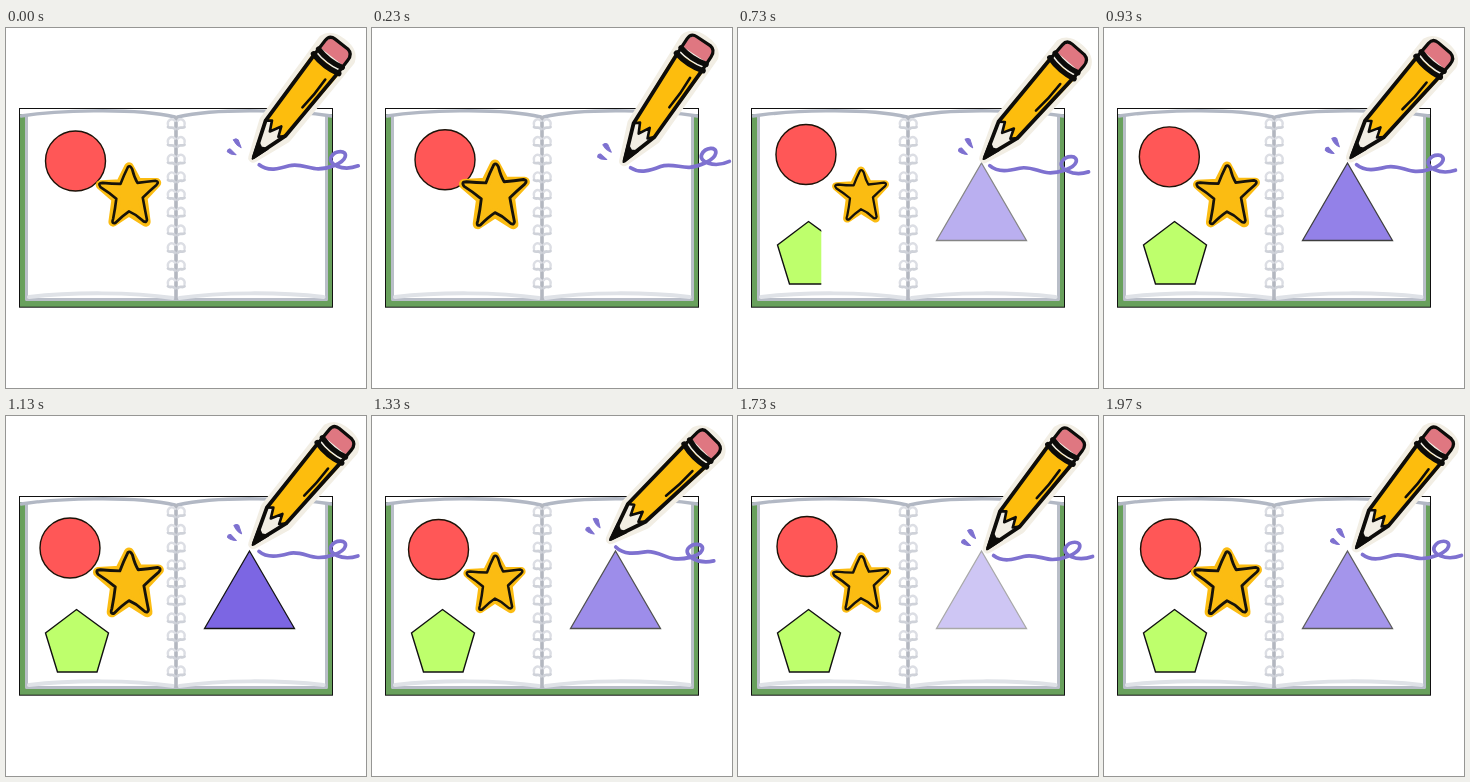
These frames come from a looping animation (360x360 px, 2.01 s). An HTML page:

```html
<!DOCTYPE html>
<html lang="en">
<head>
<meta charset="utf-8">
<title>Notebook</title>
<style>
  html, body { margin: 0; width: 100%; height: 100%; overflow: hidden; background: #fff; }
  svg { display: block; width: 100vw; height: 100vh; }
  .line { fill: none; stroke-linecap: round; stroke-linejoin: round; }
</style>
</head>
<body>
<svg viewBox="0 0 360 360">
  <defs>
    <clipPath id="wipe"><rect id="wipeBox" x="38" y="190" width="0" height="70"/></clipPath>
    <g id="ring" class="line">
      <path d="M169 -3C165 -7 161 -3 162 1" stroke="#dcdee4" stroke-width="2.4"/>
      <path d="M162 3C164 5 167 2 169 5" stroke="#cfd2d9" stroke-width="2.8"/>
    </g>
    <g id="pageEdges" class="line">
      <path d="M15 88C48 83 125 79 169 89" stroke="#b2b8c4" stroke-width="3.4"/>
      <path d="M23 269C66 264 126 264 167 270" stroke="#dfe2e7" stroke-width="4"/>
    </g>
  </defs>

  <g id="book">
    <path d="M14 86h7V272H320V86h6V279H14Z" fill="#68a05c"/>
    <path d="M20.5 88V271.5H320.5V88" class="line" stroke="#b9bec8" stroke-width="3"/>
    <use href="#pageEdges"/>
    <use href="#pageEdges" transform="matrix(-1 0 0 1 340.5 0)"/>
    <path d="M170 88V272" stroke="#b3b7c0" stroke-width="3.6"/>
    <g id="rings"></g>
    <rect x="13.5" y="80.5" width="313" height="198.7" fill="none" stroke="#111"/>
  </g>

  <circle id="disc" r="30" fill="#ff5757" stroke="#1c1208" stroke-width="1.4"/>
  <path d="M70.5 193.5L102.5 217L91 256H51.5L39.5 217Z" clip-path="url(#wipe)"
        fill="#beff6c" stroke="#111" stroke-width="1.4"/>
  <path id="triangle" d="M243.5 135L288.5 212.5H198.5Z" fill="#7a64e3" stroke="#111" stroke-width="1.3"/>

  <g id="star" stroke-linejoin="round">
    <path d="M0 -27L8 -12L26 -12L13 2L16 25L0 15L-15 25L-12 3L-27 -10L-8 -11Z"
          fill="#fbbc12" stroke="#fbbc12" stroke-width="9"/>
    <path d="M-1 -27Q1 -29 3 -25Q5 -17 8 -12Q17 -13 25 -14Q29 -13 26 -10Q19 -4 13 2Q15 13 17 23Q16 27 12 23Q7 18 0 15Q-6 19 -13 26Q-17 27 -15 22Q-13 12 -12 3Q-19 -3 -27 -8Q-30 -12 -25 -12Q-16 -11 -8 -11Q-5 -19 -1 -27Z"
          class="line" stroke="#17130a" stroke-width="2.5"/>
  </g>

  <g id="doodle">
    <path d="M-44 34C-35 41 -24 38 -14 35S6 38 15 38S40 33 42 26S32 19 28 26S39 41 55 35"
          class="line" stroke="#7e71d0" stroke-width="3.7"/>
    <path d="M-70 9Q-67 7 -65 9L-62 17Q-67 15 -70 9ZM-76 21Q-76 18 -73 18L-67 24Q-73 24 -76 21Z"
          fill="#7e71d0" stroke="#7e71d0" stroke-linejoin="round"/>
    <g transform="translate(-50 27) rotate(37.8)" stroke-linejoin="round">
      <path d="M0 0L-14 -36L-17 -136Q-14 -145 0 -145Q14 -145 17 -136L14 -36Z"
            fill="#f2eee4" stroke="#f2eee4" stroke-width="10"/>
      <path d="M-14 -37L-17 -120H17L13 -37L7 -32L3 -42L-3 -31L-8 -41Z" fill="#fdbd0d"/>
      <path d="M-14 -128Q-15 -144 -8 -144H8Q16 -143 14 -128Z" fill="#df7781"/>
      <g class="line" stroke="#0d0c0a" stroke-width="3.8">
        <path d="M0 -1L-13 -37L-15 -121M0 -1L12 -37L15 -121"/>
        <path d="M-13 -37L-8 -41L-3 -31L3 -42L7 -32L12 -37" stroke-width="2.6"/>
        <path d="M-16 -119Q0 -115 16 -119M-15 -126Q0 -122 15 -126" stroke-width="5.4"/>
        <path d="M-15 -120V-137Q-15 -144 -8 -144H8Q15 -143 15 -135V-120" stroke-width="3.2"/>
        <path d="M8 -70Q10 -88 9 -106" stroke-width="2.6"/>
      </g>
      <path d="M0 1L-6 -16L0 -13L6 -16Z" fill="#0d0c0a" stroke="#0d0c0a" stroke-width="2"/>
    </g>
  </g>
</svg>

<script>
  const LOOP = 2010, STEP = 100 / 3, LAST_STEP = 59;
  const $ = id => document.getElementById(id);
  const clamp = v => Math.min(1, Math.max(0, v));
  const wave = (t, peak, period) => Math.cos(2 * Math.PI * (t - peak) / period);

  // Smooth curve through values at the shared key times.
  const times = [0, 430, 730, 1130, 1330, 1730, 1970];
  const slope = (v, i) => {
    const a = Math.max(0, i - 1), b = Math.min(times.length - 1, i + 1);
    return (v[b] - v[a]) / (times[b] - times[a]);
  };
  function curve(v, t) {
    let i = 0;
    while (i < times.length - 2 && t >= times[i + 1]) i++;
    const d = times[i + 1] - times[i];
    const u = clamp((t - times[i]) / d), w = 1 - u;
    return v[i] * w * w * (1 + 2 * u) + v[i + 1] * u * u * (3 - 2 * u)
      + d * u * w * (w * slope(v, i) - u * slope(v, i + 1));
  }

  const disc = {
    x: [69.5, 74.5, 68, 64, 66.5, 69, 66.5],
    y: [133, 130.5, 126.5, 132, 133.5, 130.5, 133]
  };
  const doodle = {
    x: [297.2, 301.2, 297.5, 298.2, 291.8, 299.5, 302.5],
    y: [102.8, 102.8, 106, 103, 103, 105.5, 104.5],
    turn: [0, -6, 3, 2, 7.5, 0, 0]
  };

  function triangleAlpha(t) {
    if (t < 500) return 0;
    if (t < 1075) return Math.pow((t - 500) / 575, 0.75);
    return 0.67 + 0.33 * wave(t, 1075, 1180);
  }

  function draw(t) {
    const place = (id, p, extra = "") =>
      $(id).setAttribute("transform", `translate(${curve(p.x, t)} ${curve(p.y, t)})${extra}`);
    place("disc", disc);
    place("doodle", doodle, ` rotate(${curve(doodle.turn, t)})`);
    $("star").setAttribute("transform",
      `translate(123 167.5) scale(${1.02 + 0.13 * wave(t, 1090, 905)})`);
    $("wipeBox").setAttribute("width", 66 * clamp((t - 500) / 340));
    $("triangle").setAttribute("opacity", triangleAlpha(t));
  }

  $("rings").innerHTML = Array.from({ length: 10 }, (_, i) => {
    const y = 96 + i * 17.7;
    return `<use href="#ring" y="${y}"/><use href="#ring" transform="matrix(-1 0 0 1 340.5 ${y})"/>`;
  }).join("");

  // Steps fall on hundredths of a second, so a small lead rounds them in.
  const start = performance.now();
  function tick() {
    const t = (performance.now() - start) % LOOP;
    draw(STEP * Math.min(LAST_STEP, Math.floor((t + 5) / STEP)));
    requestAnimationFrame(tick);
  }
  tick();
</script>
</body>
</html>
```
